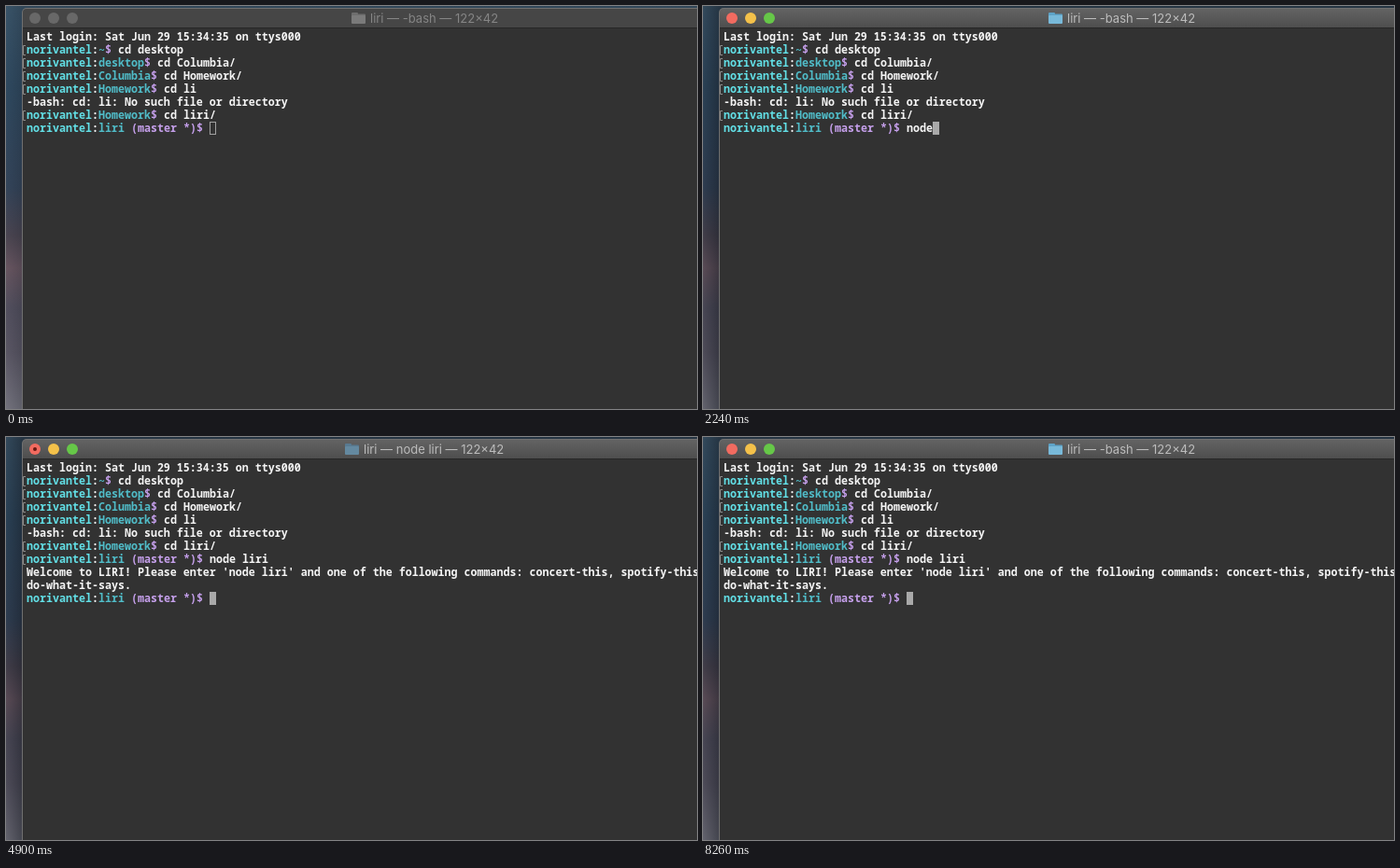
Animation, 740 px wide and 432 px high, one loop 8.33 s. Source, as an HTML page with a canvas:

```html
<!DOCTYPE html>
<html lang="en">
<head>
<meta charset="utf-8">
<title>Terminal session</title>
<style>
  html, body { margin: 0; width: 100%; height: 100%; overflow: hidden; background: #323232; }
  canvas { display: block; width: 740px; height: 432px; }
</style>
</head>
<body>
<canvas id="stage" width="740" height="432"></canvas>
<script>
const W = 740, H = 432, LOOP = 8330;
const ctx = document.getElementById('stage').getContext('2d');

const CELL = 7, ROW = 14, LEFT = 22, BASE = 37;
const MONO = '11.667px "Noto Sans Mono", "DejaVu Sans Mono", monospace';
const TITLE_FONT = '13px Inter, "Liberation Sans", sans-serif';
const WHITE = '#f4f4f4', USER_COLOR = '#62dfe6', PATH_COLOR = '#50bcc8', PURPLE = '#c6a0ec';
const USER = 'norivantel';

// Moments of the session, in ms
const FOCUS = 70, ENTER = 3780, NODE_TITLE = 4270, OUTPUT = 4760, BASH_TITLE = 5040;
const COMMAND = 'node liri';
const KEYS = [1540, 1680, 1890, 2100, 2310, 2520, 2590, 2800, 3290];

const HISTORY = [
  ['~', 'cd desktop'],
  ['desktop', 'cd Columbia/'],
  ['Columbia', 'cd Homework/'],
  ['Homework', 'cd li'],
  null,
  ['Homework', 'cd liri/']
];

function vertical(y0, y1, stops) {
  const g = ctx.createLinearGradient(0, y0, 0, y1);
  stops.forEach(([at, color]) => g.addColorStop(at, color));
  return g;
}

function write(text, col, row, color = WHITE, weight = 600) {
  ctx.font = weight + ' ' + MONO;
  ctx.fillStyle = color;
  ctx.fillText(text, LEFT + col * CELL, BASE + row * ROW);
  return col + text.length;
}

function mark(row) {
  const y = BASE + row * ROW;
  ctx.strokeStyle = '#8c8c8c';
  ctx.lineWidth = 1;
  ctx.beginPath();
  ctx.moveTo(21, y - 8.5);
  ctx.lineTo(18.5, y - 8.5);
  ctx.lineTo(18.5, y + 1.5);
  ctx.lineTo(21, y + 1.5);
  ctx.stroke();
}

// Returns the column where the command begins
function prompt(row, path, branch = '') {
  let col = write(USER, 0, row, USER_COLOR, 700);
  col = write(':', col, row);
  col = write(path, col, row, PATH_COLOR);
  return write(branch + '$', col, row, PURPLE) + 1;
}

function cursor(col, row, solid) {
  const x = LEFT + col * CELL, y = BASE + row * ROW - 11;
  if (solid) {
    ctx.fillStyle = '#a9a9a9';
    ctx.fillRect(x, y, CELL, ROW);
  } else {
    ctx.strokeStyle = '#a0a0a0';
    ctx.lineWidth = 1;
    ctx.strokeRect(x + 0.5, y + 0.5, CELL - 1, ROW - 1);
  }
}

function wallpaper(focused) {
  ctx.fillStyle = vertical(0, H, [
    [0, '#3b566b'], [0.2, '#304b62'], [0.45, '#35465c'],
    [0.57, '#4d4753'], [0.65, '#6b5863'], [0.75, '#555261'],
    [0.86, '#5d5967'], [1, '#777681']
  ]);
  ctx.fillRect(0, 0, W, H);
  const shade = ctx.createLinearGradient(0, 0, 18, 0);
  shade.addColorStop(0, `rgba(18,22,30,${focused ? 0.2 : 0.04})`);
  shade.addColorStop(1, `rgba(18,22,30,${focused ? 0.52 : 0.24})`);
  ctx.fillStyle = shade;
  ctx.fillRect(0, 0, W, H);
}

function folder(x, color, back) {
  ctx.fillStyle = back;
  ctx.beginPath();
  ctx.roundRect(x, 7, 7, 5, 1);
  ctx.roundRect(x, 8.5, 15, 6, 1);
  ctx.fill();
  ctx.fillStyle = color;
  ctx.beginPath();
  ctx.roundRect(x, 10, 15, 9, 1);
  ctx.fill();
}

function light(x, color) {
  ctx.fillStyle = color;
  ctx.beginPath();
  ctx.arc(x, 13, 6, 0, Math.PI * 2);
  ctx.fill();
}

function frame(focused, running) {
  ctx.fillStyle = '#707070';
  ctx.beginPath();
  ctx.roundRect(17, 2, W, H + 10, 5);
  ctx.fill();

  ctx.fillStyle = focused
    ? vertical(3, 24, [[0, '#636363'], [1, '#4d4d4d']])
    : '#464646';
  ctx.beginPath();
  ctx.roundRect(18, 3, W, 21, [4, 0, 0, 0]);
  ctx.fill();
  ctx.fillStyle = '#323232';
  ctx.fillRect(18, 24, W, H);
  ctx.fillStyle = '#272727';
  ctx.fillRect(18, 23, W, 1);

  const lights = focused ? ['#f26b60', '#f4c14a', '#66c748'] : ['#686868', '#686868', '#686868'];
  lights.forEach((color, i) => light(31 + i * 20, color));
  if (running) {
    ctx.fillStyle = '#651812';
    ctx.beginPath();
    ctx.arc(31, 13, 2, 0, Math.PI * 2);
    ctx.fill();
  }

  const x = running ? 363 : 370;
  if (!focused) folder(x, '#7b7b7b', '#6e6e6e');
  else if (running) folder(x, '#6489a0', '#587a91');
  else folder(x, '#78b9d9', '#5ea3c7');
  ctx.font = TITLE_FONT;
  ctx.fillStyle = focused ? '#bcbcbc' : '#858585';
  ctx.fillText(`liri — ${running ? 'node liri' : '-bash'} — 122×42`, x + 20, 18);
}

function session(t, focused) {
  write('Last login: Sat Jun 29 15:34:35 on ttys000', 0, 0);
  HISTORY.forEach((entry, i) => {
    const row = i + 1;
    if (!entry) {
      write('-bash: cd: li: No such file or directory', 0, row);
      return;
    }
    mark(row);
    write(entry[1], prompt(row, entry[0]), row);
  });

  const typed = COMMAND.slice(0, KEYS.filter(k => t >= k).length);
  const end = write(typed, prompt(7, 'liri', ' (master *)'), 7);
  if (t < ENTER) {
    cursor(end, 7, focused);
    return;
  }
  mark(7);
  if (t < OUTPUT) {
    cursor(0, 8, true);
    return;
  }
  write("Welcome to LIRI! Please enter 'node liri' and one of the following commands: concert-this, spotify-this-song, movie-this, ", 0, 8);
  write('do-what-it-says.', 0, 9);
  cursor(prompt(10, 'liri', ' (master *)'), 10, true);
}

function draw(now) {
  const t = now % LOOP;
  const focused = t >= FOCUS;
  wallpaper(focused);
  frame(focused, t >= NODE_TITLE && t < BASH_TITLE);
  session(t, focused);
}

const start = performance.now();
function tick() {
  draw(performance.now() - start);
  requestAnimationFrame(tick);
}
tick();
</script>
</body>
</html>
```
